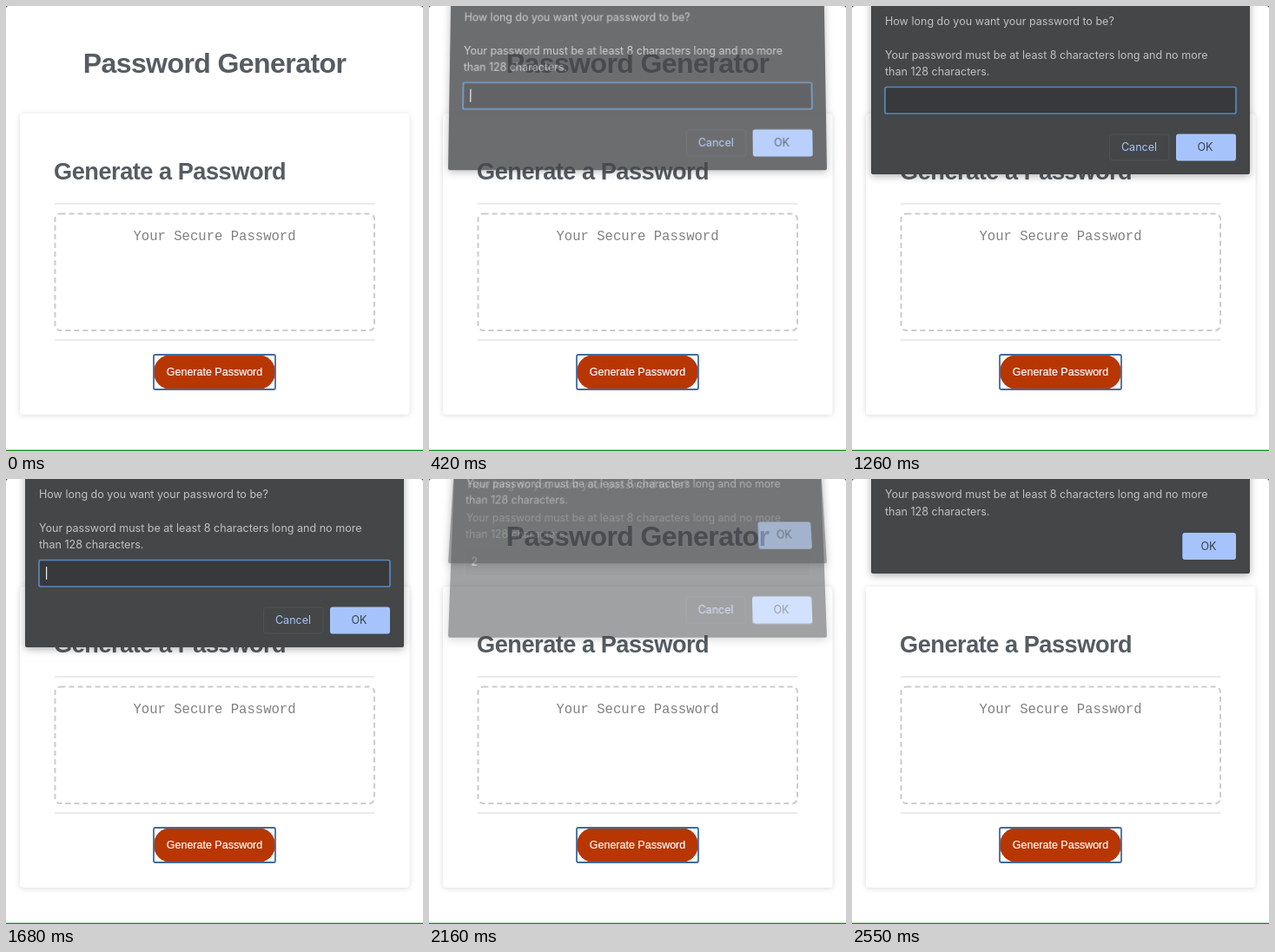
These frames come from a looping animation (480x513 px, 2610 ms). An HTML page:

```html
<!DOCTYPE html>
<html lang="en">
<head>
<meta charset="utf-8">
<title>Password Generator</title>
<style>
  html, body { margin: 0; height: 100%; overflow: hidden; background: #fff; }
  svg { position: absolute; left: 0; top: 0; overflow: visible; }
  .page { font-family: "Liberation Sans", Arial, sans-serif; fill: #555c63; }
  .heading { font-weight: bold; letter-spacing: -.018em; }
  .card { fill: #fff; filter: drop-shadow(0 1px 3px rgba(30, 40, 60, .17)); }
  .rule { stroke: #e4e4e4; stroke-width: 1.5; }
  .output { fill: none; stroke: #ccc; stroke-width: 2; stroke-dasharray: 6 4; }
  .mono { font: 15.6px "Liberation Mono", "Courier New", monospace; fill: #808080; }
  .dialog { font: 12.55px Inter, sans-serif; fill: #bfc1c3; transform-origin: 50% 100%; }
  .panel { fill: #444648; filter: drop-shadow(0 2px 5px rgba(0, 0, 0, .32)); }
  .field { fill: #37393c; stroke: #5688bd; stroke-width: 1.7; }
  .sent .field { fill: #404244; stroke: #484a4c; }
  .cancel { fill: none; stroke: #505356; }
  .ok { fill: #a6c4fb; }
  .label { text-anchor: middle; }
</style>
</head>
<body>
<svg class="page" width="480" height="513">
  <path d="M0 0h2L0 2zM480 0h-2l2 2z" fill="#666"/>
  <rect y="511.7" width="480" height="1.3" fill="#15861b"/>
  <text class="heading label" x="240" y="77" font-size="32">Password Generator</text>
  <rect class="card" x="16" y="124" width="448.5" height="347" rx="4"/>
  <text class="heading" x="55" y="199.5" font-size="27.2">Generate a Password</text>
  <path class="rule" d="M56 228H424.5M56 385H424.5"/>
  <rect class="output" x="56.5" y="239.5" width="367.5" height="134.5" rx="6"/>
  <text class="mono label" x="240" y="269.5">Your Secure Password</text>
  <rect x="170" y="402" width="140" height="40" rx="20" fill="#b83602"/>
  <rect x="170" y="402" width="140" height="40" rx="2" fill="none" stroke="#3f6c9c" stroke-width="1.8"/>
  <text class="label" x="240" y="425.7" font-size="12.5" fill="#fff" stroke="#fff" stroke-width=".2">Generate Password</text>
</svg>

<svg id="prompt" class="dialog" width="480" height="194">
  <rect class="panel" x="22" y="-40" width="436" height="234" rx="2"/>
  <text x="38" y="22">How long do you want your password to be?</text>
  <text x="38" y="61">Your password must be at least 8 characters long and no more</text>
  <text x="38" y="80">than 128 characters.</text>
  <rect class="field" x="38" y="93.5" width="404" height="30.5" rx="2"/>
  <text id="digit" x="45.5" y="112.5" fill="#e4e5e6">2</text>
  <rect id="caret" y="101" width="1.2" height="15" fill="#f0f0f0"/>
  <rect class="cancel" x="296.5" y="148" width="68.5" height="30" rx="3"/>
  <text class="label" x="330.5" y="167" fill="#a6c4fb">Cancel</text>
  <rect class="ok" x="373" y="147.5" width="69" height="31" rx="3"/>
  <text class="label" x="406.5" y="167" fill="#39414f">OK</text>
</svg>

<svg id="alert" class="dialog" width="480" height="109">
  <rect class="panel" x="22" y="-40" width="436" height="149" rx="2"/>
  <text x="38" y="22">Your password must be at least 8 characters long and no more</text>
  <text x="38" y="41.5">than 128 characters.</text>
  <rect x="379" y="62" width="8" height="31" rx="3" fill="#2c4672"/>
  <rect class="ok" x="380.3" y="62" width="61.7" height="31" rx="3"/>
  <text class="label" x="410.5" y="81.5" fill="#39414f">OK</text>
</svg>
<script>
  const LOOP = 2610, TYPED = 1800, SUBMIT = 2105, FADE = 115, BLINK = 500;
  const byId = id => document.getElementById(id);
  const [promptBox, alertBox, digit, caret] = ["prompt", "alert", "digit", "caret"].map(byId);
  const ramp = (t, start) => Math.min(1, Math.max(0, (t - start) / FADE));

  // A dialog drops in while fading; its hidden top edge leans back, so it narrows upwards.
  function show(dialog, height, amount) {
    const rest = 1 - amount;
    const lean = .085 * rest;
    const stretch = 1 + .7 * lean;
    dialog.style.opacity = amount;
    dialog.style.transform = `translateY(${-23 * rest}px) ` +
      `matrix3d(1,0,0,0, 0,${stretch},0,${-lean / height}, 0,0,1,0, 0,0,0,1)`;
  }

  function draw() {
    const t = performance.now() % LOOP;
    const typed = t >= TYPED, sent = t >= SUBMIT;
    const caretOn = typed ? !sent : Math.floor((t - 420) / BLINK) % 2 === 0;
    show(promptBox, 234, ramp(t, 330) * (1 - ramp(t, SUBMIT)));
    show(alertBox, 149, ramp(t, SUBMIT));
    promptBox.classList.toggle("sent", sent);
    digit.setAttribute("opacity", +typed);
    caret.setAttribute("opacity", +caretOn);
    caret.setAttribute("x", typed ? 53.5 : 46);
    requestAnimationFrame(draw);
  }
  draw();
</script>
</body>
</html>
```
